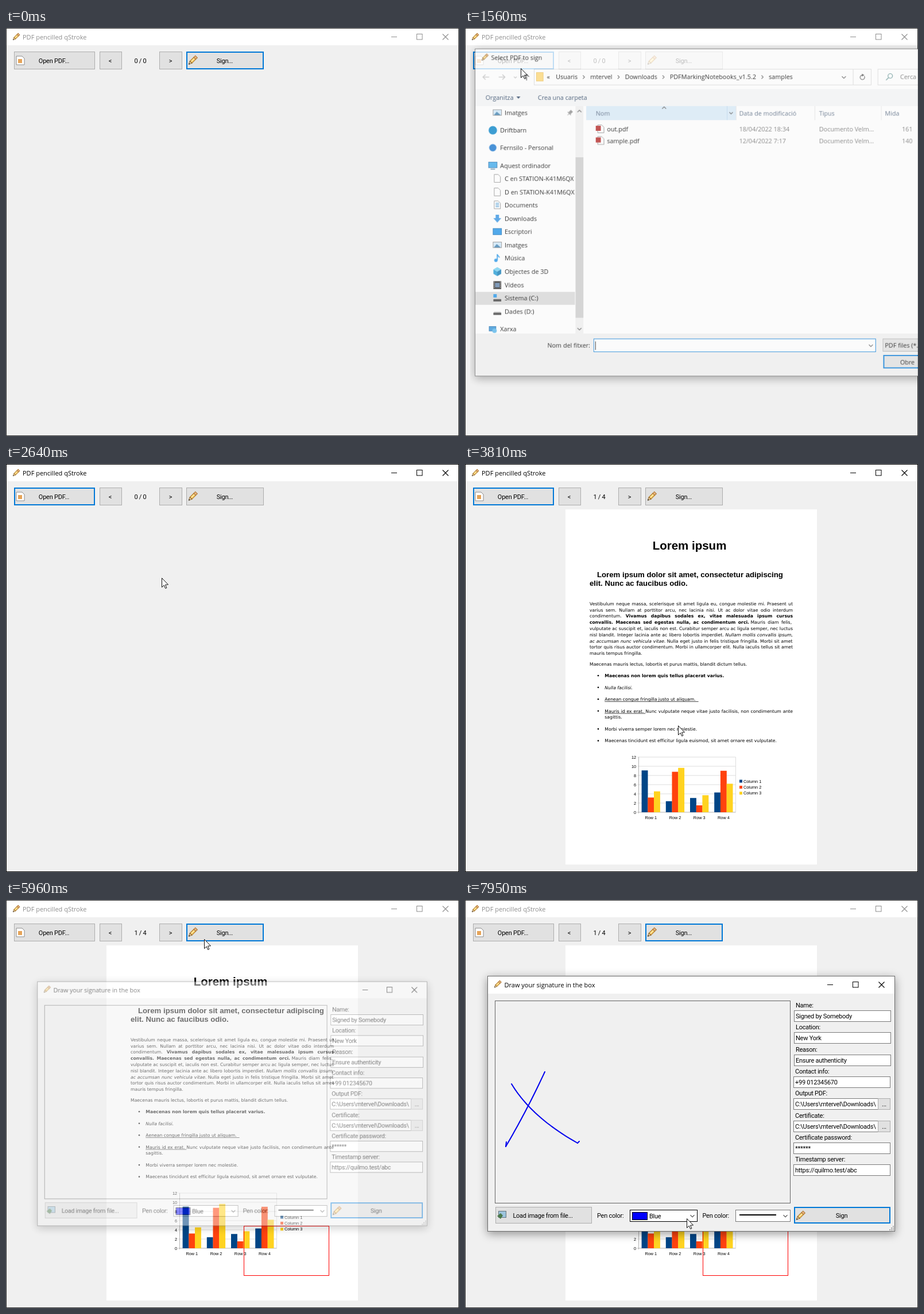
Recreate the animation shown at these times as an HTML page with a canvas. Size 789 by 710 pixels, loop 8000 ms.

```html
<!DOCTYPE html>
<html lang="ca">
<head>
<meta charset="utf-8">
<title>Signing demo</title>
<style>
html, body { margin: 0; width: 100%; height: 100%; overflow: hidden; background: #f0f0f0; }
canvas { display: block; }
</style>
</head>
<body>
<canvas width="789" height="710"></canvas>
<script>
const screenCtx = document.querySelector('canvas').getContext('2d');
const layer = document.createElement('canvas');
layer.width = 960;
layer.height = 710;
const layerCtx = layer.getContext('2d');
let ctx = screenCtx;

const UI = '11px "Open Sans", sans-serif';
const FORM = '11px Roboto, sans-serif';
const SANS = ' "Liberation Sans", sans-serif';
const BLUE = '#0078d7', GREY = '#6d6d6d', EDGE = '#7a7a7a';
const APP = 'PDF pencilled qStroke';

// ---- drawing helpers ----
function rect(color, x, y, w, h) {
  ctx.fillStyle = color;
  ctx.fillRect(x, y, w, h);
}
function box(x, y, w, h, fill, border, size = 1) {
  rect(border, x, y, w, h);
  rect(fill, x + size, y + size, w - 2 * size, h - 2 * size);
}
function text(s, x, y, font = UI, color = '#000', align = 'left') {
  ctx.font = font;
  ctx.letterSpacing = font === FORM ? '-0.25px' : '0px';
  ctx.fillStyle = color;
  ctx.textAlign = align;
  ctx.fillText(s, x, y);
}
function trace(pts) {
  ctx.beginPath();
  pts.forEach(([x, y]) => ctx.lineTo(x, y));
}
function line(color, pts, width = 1) {
  trace(pts);
  ctx.strokeStyle = color;
  ctx.lineWidth = width;
  ctx.stroke();
}
function poly(fill, pts, border) {
  trace(pts);
  ctx.closePath();
  ctx.fillStyle = fill;
  ctx.fill();
  if (!border) return;
  ctx.strokeStyle = border;
  ctx.lineWidth = 1;
  ctx.stroke();
}
function disc(color, x, y, r) {
  ctx.fillStyle = color;
  ctx.beginPath();
  ctx.arc(x, y, r, 0, 7);
  ctx.fill();
}
function ring(color, x, y, r, from = 0, to = 7) {
  ctx.beginPath();
  ctx.arc(x, y, r, from, to);
  ctx.strokeStyle = color;
  ctx.lineWidth = 1.2;
  ctx.stroke();
}
function at(x, y, draw, { scale = 1, turn = 0 } = {}) {
  ctx.save();
  ctx.translate(x, y);
  ctx.rotate(turn * Math.PI / 180);
  ctx.scale(scale, scale);
  draw();
  ctx.restore();
}
function clipped(x, y, w, h, draw) {
  ctx.save();
  ctx.beginPath();
  ctx.rect(x, y, w, h);
  ctx.clip();
  draw();
  ctx.restore();
}
// Chevrons and arrows point right, then turn
function chevron(x, y, turn = 90, r = 3.5, color = '#555') {
  at(x, y, () => line(color, [[-r / 2, -r], [r / 2, 0], [-r / 2, r]], 1.1), { turn });
}
function arrow(x, y, turn, color) {
  at(x, y, () => {
    line(color, [[-5.5, 0], [5.5, 0]], 1.5);
    line(color, [[1, -4.5], [5.5, 0], [1, 4.5]], 1.5);
  }, { turn });
}
function pencil(x, y, scale = 1) {
  at(x + .5 * scale, y + 15 * scale, () => {
    poly('#f4dcb4', [[0, 0], [5, -2.6], [5, 2.6]], '#8a6226');
    box(5, -3, 10, 6, '#f6c55c', '#a8752c');
    box(14, -3, 5, 6, '#e9b080', '#a8752c');
    rect('#fff0b8', 6, -1, 8, 1.4);
    disc('#333', .8, 0, 1);
  }, { scale, turn: -45 });
}
function sheet(x, y, w, h, border = '#8c8c8c') {
  poly('#fff', [[x, y], [x + w - 4, y], [x + w, y + 4], [x + w, y + h], [x, y + h]], border);
}
function windowButtons(x, y, color) {
  line(color, [[x, y], [x + 10, y]]);
  ctx.strokeRect(x + 44.5, y - 5, 9.5, 9.5);
  for (const d of [-5, 5]) line(color, [[x + 89.5, y - d], [x + 99.5, y + d]], 1.1);
}
function button(x, y, w, h, label, center, state) {
  const fill = { hover: '#e5f1fb', down: '#cce4f7' }[state] || '#e1e1e1';
  const border = { hover: BLUE, down: '#005499', focus: BLUE }[state] || '#adadad';
  box(x, y, w, h, fill, border, state === 'focus' ? 2 : 1);
  text(label, center, y + h / 2 + 4, FORM, '#000', 'center');
}
function panel(x, y, w, h) {
  ctx.save();
  ctx.shadowColor = 'rgba(0,0,0,.4)';
  ctx.shadowBlur = 15;
  ctx.shadowOffsetY = 4;
  rect('#6a6a6a', x, y, w, h);
  ctx.restore();
  rect('#fff', x + 1, y + 1, w - 2, h - 2);
}

// ---- pointer motion ----
// Each hop starts where the last one ended; a via point bends it, ink leaves a trail.
const HOPS = [
  { from: 400, to: 1080, end: [97, 70] },
  { from: 1930, to: 2020, end: [259, 169] },
  { from: 2120, to: 2300, end: [271, 198] },
  { from: 3570, to: 3950, end: [414, 567] },
  { from: 4000, to: 4400, end: [562, 653], drag: true },
  { from: 4840, to: 5620, end: [345, 68] },
  { from: 6270, to: 6500, end: [139, 299] },
  { from: 6530, to: 6760, end: [71, 429], via: [108, 366], drag: true, ink: true },
  { from: 6760, to: 6810, end: [72, 421], drag: true, ink: true },
  { from: 6870, to: 7050, end: [81, 320] },
  { from: 7110, to: 7450, end: [196, 423], via: [116, 378], drag: true, ink: true },
  { from: 7450, to: 7490, end: [199, 420], drag: true, ink: true },
  { from: 7540, to: 7930, end: [386, 554] }
];
HOPS.forEach((hop, i) => {
  hop.start = i ? HOPS[i - 1].end : [330, 330];
  hop.release = i + 1 < HOPS.length ? HOPS[i + 1].from : 8000;
  hop.via ||= hop.start.map((v, k) => (v + hop.end[k]) / 2);
});
const [CLICK_OPEN, CLICK_FILE, CLICK_AGAIN, CLICK_SIGN] = [1150, 2340, 2450, 5715];
const CLICKS = [CLICK_OPEN, CLICK_FILE, CLICK_AGAIN, CLICK_SIGN];
const DRAG = HOPS.find(hop => hop.drag);

const clamp = u => Math.max(0, Math.min(1, u));
const smooth = u => u * u * (3 - 2 * u);
const progress = (hop, t) => smooth(clamp((t - hop.from) / (hop.to - hop.from)));
const pointOn = ({ start, via, end }, u) =>
  start.map((v, k) => (1 - u) ** 2 * v + 2 * u * (1 - u) * via[k] + u * u * end[k]);

function pointerAt(t) {
  const hop = HOPS.findLast(h => h.from <= t) || HOPS[0];
  return pointOn(hop, progress(hop, t));
}
const pressed = t => CLICKS.some(c => t >= c && t < c + 90)
  || HOPS.some(h => h.drag && t >= h.from - 30 && t < h.release);

function pointer(t) {
  if (t < HOPS[0].from) return;
  const [x, y] = pointerAt(t).map(Math.round);
  if (pressed(t)) disc('rgba(255,255,0,.55)', x, y, 12);
  at(x + .5, y + .5, () => poly('#fff',
    [[0, 0], [0, 16], [3.7, 12.5], [6.2, 18], [8.4, 17], [6, 11.6], [11, 11.4]], '#111'));
}
function ink(t) {
  ctx.lineJoin = ctx.lineCap = 'round';
  for (const hop of HOPS.filter(h => h.ink && t >= h.from)) {
    const reach = progress(hop, t);
    line('#00e', Array.from({ length: 25 }, (_, i) => pointOn(hop, reach * i / 24)), 2);
  }
  ctx.lineJoin = 'miter';
  ctx.lineCap = 'butt';
}

// ---- the document ----
// Inline marks: * bold, _ italic, ~ underline. A width justifies the line.
function rich(s, x, y, width) {
  const on = {}, runs = [];
  for (const part of s.split(/([*_~])/)) {
    if (part && '*_~'.includes(part)) on[part] = !on[part];
    else if (part) runs.push({ part, under: on['~'],
      font: `${on._ ? 'italic ' : ''}${on['*'] ? 'bold ' : ''}7.7px "DejaVu Sans", sans-serif` });
  }
  const measure = r => {
    ctx.font = r.font;
    return ctx.measureText(r.part).width;
  };
  ctx.letterSpacing = ctx.wordSpacing = '0px';
  const natural = runs.reduce((sum, r) => sum + measure(r), 0);
  if (width) ctx.wordSpacing = (width - natural) / (s.split(' ').length - 1) + 'px';
  for (const r of runs) {
    const w = measure(r);
    text(r.part, x, y, r.font);
    if (r.under) rect('#222', x, y + 1.2, w, .8);
    x += w;
  }
  ctx.wordSpacing = '0px';
}
// All lines but the last are justified
function paragraph(lines, x, y) {
  lines.forEach((s, i) => rich(s, x, y + i * 10.8, i < lines.length - 1 ? 571 - x : 0));
}
const BODY = [
  'Vestibulum neque massa, scelerisque sit amet ligula eu, congue molestie mi. Praesent ut',
  'varius sem. Nullam at porttitor arcu, nec lacinia nisi. Ut ac dolor vitae odio interdum',
  'condimentum. *Vivamus dapibus sodales ex, vitae malesuada ipsum cursus*',
  '*convallis. Maecenas sed egestas nulla, ac condimentum orci.* Mauris diam felis,',
  'vulputate ac suscipit et, iaculis non est. Curabitur semper arcu ac ligula semper, nec luctus',
  'nisl blandit. Integer lacinia ante ac libero lobortis imperdiet. _Nullam mollis convallis ipsum,_',
  '_ac accumsan nunc vehicula vitae._ Nulla eget justo in felis tristique fringilla. Morbi sit amet',
  'tortor quis risus auctor condimentum. Morbi in ullamcorper elit. Nulla iaculis tellus sit amet',
  'mauris tempus fringilla.'
];
const BULLETS = [
  ['*Maecenas non lorem quis tellus placerat varius.*'],
  ['_Nulla facilisi._'],
  ['~Aenean congue fringilla justo ut aliquam.  ~'],
  ['~Mauris id ex erat. ~Nunc vulputate neque vitae justo facilisis, non condimentum ante', 'sagittis.'],
  ['Morbi viverra semper lorem nec molestie.'],
  ['Maecenas tincidunt est efficitur ligula euismod, sit amet ornare est vulputate.']
];
const COLUMNS = { '#004586': [9.1, 2.4, 3.1, 4.3], '#ff420e': [3.2, 8.8, 1.5, 9.02], '#ffd320': [4.54, 9.65, 3.7, 6.2] };

function chart() {
  const small = '7.3px' + SANS;
  for (let v = 0; v <= 12; v += 2) {
    const y = 606 - v * 8;
    rect(v ? '#ddd' : '#b3b3b3', 300, y - .5, 171.5, 1);
    text(v, 298, y + 2.7, small, '#000', 'right');
  }
  rect('#b3b3b3', 302, 510, 1, 98);
  rect('#ddd', 471, 510, 1, 96);
  Object.entries(COLUMNS).forEach(([color, values], j) => {
    values.forEach((v, i) => rect(color, 307.6 + i * 42.2 + j * 10.7, 606 - v * 8, 10.9, v * 8));
    rect(color, 478, 549.5 + j * 10.4, 5, 5);
    text('Column ' + (j + 1), 485, 554.6 + j * 10.4, small);
  });
  for (let i = 0; i < 4; i++) text('Row ' + (i + 1), 323.8 + i * 42.2, 618, small, '#000', 'center');
}
function documentPage() {
  rect('#fff', 175, 79, 438, 618);
  text('Lorem ipsum', 391, 148.5, 'bold 20.5px' + SANS, '#000', 'center');
  text('Lorem ipsum dolor sit amet, consectetur adipiscing', 230, 197, 'bold 13.2px' + SANS);
  text('elit. Nunc ac faucibus odio.', 217, 212.3, 'bold 13.2px' + SANS);
  paragraph(BODY, 217, 245.8);
  rich('Maecenas mauris lectus, lobortis et purus mattis, blandit dictum tellus.', 217, 351.2);
  let y = 371;
  for (const lines of BULLETS) {
    disc('#000', 232, y - 2.7, 1.3);
    paragraph(lines, 243.3, y);
    y += 9.7 + lines.length * 10.8;
  }
  chart();
}

// ---- main window ----
const OPENING = 1480, CHOSEN = 2640, SIGNING = 5920;

function mainWindow(t) {
  const active = t >= CLICK_OPEN && t < 1250 || t >= CHOSEN && t < 5960;
  const tint = active ? '#000' : '#8e8e8e';
  box(0, 0, 789, 710, '#f0f0f0', active ? '#000' : '#2e2e2e');
  rect('#fff', 1, 1, 787, 29);
  pencil(12, 9, .78);
  text(APP, 29, 20, UI, tint);
  windowButtons(671, 15.5, tint);

  const [px, py] = pointerAt(t);
  const blocked = t < 400 || t >= OPENING && t < CHOSEN || t >= 5960;
  const tool = (x, w, label, center, focus) => {
    const hot = !blocked && px >= x && px < x + w && py >= 41 && py < 72;
    button(x, 41, w, 31, label, center, hot ? pressed(t) ? 'down' : 'hover' : focus && 'focus');
  };
  const openFocus = t >= CLICK_OPEN && t < CLICK_SIGN;
  tool(14, 141, 'Open PDF...', 83.5, openFocus);
  tool(163, 39, '<', 181.5);
  tool(267, 40, '>', 286.5);
  tool(314, 135, 'Sign...', 381, !openFocus);
  sheet(18, 49, 14, 15);
  rect('#e5a45a', 21, 54, 7, 7);
  pencil(318, 48);
  text(t < 3010 ? '0 / 0' : '1 / 4', 234, 60.5, FORM, '#000', 'center');
  if (t >= 3010) documentPage();
  if (t >= DRAG.from) {
    const [x, y] = pointOn(DRAG, progress(DRAG, t)).map(Math.round);
    ctx.strokeStyle = '#f00';
    ctx.lineWidth = 1;
    ctx.strokeRect(414.5, 567.5, x - 414, y - 567);
  }
}

// ---- file dialog ----
const ICONS = {
  picture() { box(0, 2, 16, 11, '#cfe8fa', '#8a8a8a'); poly('#3a7fb0', [[2, 12], [7, 6], [14, 12]]); },
  sync() { disc('#0082c9', 8, 8, 7.5); },
  cloud() { disc('#1273cf', 8, 8, 6.5); },
  screen() { box(0, 1, 16, 11, '#3aa8ec', '#1f6fae'); rect('#6f93ad', 4, 13, 8, 2); },
  blank() { sheet(2.5, .5, 11, 14); },
  lines() { ICONS.blank(); for (let y = 4; y < 13; y += 3) rect('#2f8cd0', 5, y, 6, 1.3); },
  down() { rect('#2f92e4', 5, 1, 6, 7); poly('#2f92e4', [[1, 7], [15, 7], [8, 15]]); },
  desk() { box(0, 2, 16, 12, '#1c92e8', '#0c6ab6'); },
  note() { disc('#1c92e8', 5.5, 12, 3); rect('#1c92e8', 7, 1, 1.8, 11); line('#1c92e8', [[8, 2], [12, 7]], 1.8); },
  cube() {
    ['#1b9ad6', '#6fd0f2', '#0c78b4'].forEach((color, face) => {
      const corner = k => [8 + 8 * Math.cos((k + 2.5 + 2 * face - 1) * Math.PI / 3),
        8 + 8 * Math.sin((k + 2.5 + 2 * face - 1) * Math.PI / 3)];
      poly(color, [[8, 8], corner(0), corner(1), corner(2)]);
    });
  },
  film() { box(1, 1, 14, 14, '#5b7fa8', '#222', 3); for (let y = 2; y < 14; y += 3) for (const x of [2, 13]) rect('#eee', x, y, 1, 1.6); },
  drive() { rect('#c9c9c9', 2, 8, 12, 2); rect('#3c3c3c', 1, 10, 14, 4); },
  system() { ICONS.drive(); rect('#1c92e8', 1, 1, 6, 6); },
  network() { box(1, 3, 13, 9, '#2f92d8', '#1f6fae'); disc('#54b6ec', 11, 11, 4); }
};
// A leading dash marks an indented entry
const TREE = ['picture -Imatges', 'sync Driftbarn', 'cloud Fernsilo - Personal', 'screen Aquest ordinador',
  'blank -C en STATION-K41M6QX', 'blank -D en STATION-K41M6QX', 'lines -Documents', 'down -Downloads',
  'desk -Escriptori', 'picture -Imatges', 'note -Música', 'cube -Objectes de 3D', 'film -Vídeos',
  'system -Sistema (C:)', 'drive -Dades (D:)', 'network Xarxa'];
const CRUMBS = ['Usuaris', 'mtervel', 'Downloads', 'PDFMarkingNotebooks_v1.5.2', 'samples'];
const FILES = [['out.pdf', '18/04/2022 18:34', 161], ['sample.pdf', '12/04/2022 7:17', 140]];

function tree() {
  rect('#d9d9d9', 9, 462, 177, 23);
  let y = 144;
  TREE.forEach((entry, i) => {
    const [, icon, dash, label] = entry.match(/(\w+) (-?)(.*)/);
    if (i) y += dash ? 23.55 : 31.2;
    const x = dash ? 40 : 32;
    at(x, Math.round(y) - 8, ICONS[icon]);
    text(label, x + 21, Math.round(y) + 4);
  });
  at(177, 144, () => {
    rect('#8a8a8a', -2.5, -5, 5, 6);
    rect('#8a8a8a', -4, 1, 8, 1.2);
    rect('#8a8a8a', -.5, 2, 1, 4);
  }, { turn: 45 });
}
function addressBar() {
  arrow(28, 80.5, 180, '#c4c4c4');
  arrow(56, 80.5, 0, '#c4c4c4');
  chevron(80, 81, 90, 2.5, '#bbb');
  arrow(100, 81, -90, '#555');
  box(113, 66, 600, 29, '#fff', '#d9d9d9');
  rect('#d9d9d9', 680, 66, 1, 29);
  box(117, 72, 13, 16, '#ffd875', '#f0c35a');
  text('«', 136, 84);
  let x = 152;
  CRUMBS.forEach((s, i) => {
    if (i) chevron(x - 11.5, 80.5, 0, 3);
    text(s, x, 84);
    x += ctx.measureText(s).width + 22.5;
  });
  chevron(664, 81);
  ring('#555', 697, 81, 4, -.6, 4.6);
  poly('#555', [[696, 74.5], [700.5, 77], [696, 79.5]]);
  box(724, 66, 175, 29, '#fff', '#d9d9d9');
  ring('#5b8f8f', 746.5, 78.5, 4);
  line('#5b8f8f', [[743.5, 81.5], [739, 86]], 1.3);
  text('Cerca', 764, 84, UI, GREY);
}
function fileDialog(t) {
  const wide = 898;
  panel(8, 30, wide + 2, 582);
  pencil(20, 39, .78);
  text('Select PDF to sign', 37, 50);
  addressBar();

  rect('#f5f6f7', 9, 102, wide, 30);
  text('Organitza', 27, 121, UI, '#1e395b');
  poly('#1e395b', [[82, 115], [89, 115], [85.5, 119]]);
  text('Crea una carpeta', 120, 121, UI, '#1e395b');

  clipped(9, 132, 177, 404, tree);
  rect('#f0f0f0', 187, 132, 14, 404);
  rect('#cdcdcd', 187, 223, 14, 285);
  chevron(194, 141, -90);
  chevron(194, 528);

  rect('#d9ebf9', 206, 132, 266, 25);
  rect('#b9d7ee', 456, 132, 1, 25);
  for (const x of [472, 612, 730]) rect('#e5e5e5', x, 132, 1, 25);
  chevron(344.5, 135, -90);
  chevron(463.5, 144.5, 90, 3);
  const heads = { Nom: 223, 'Data de modificació': 478, Tipus: 620, Mida: 737 };
  for (const s in heads) text(s, heads[s], 149, UI, '#4c607a');

  const chosen = t >= CLICK_FILE;
  if (pointerAt(t)[1] > 184) rect(chosen ? '#cce8ff' : '#e5f3ff', 206, 184, wide - 197, 21);
  FILES.forEach(([name, date, size], i) => {
    const y = 177 + i * 20.7;
    sheet(226.5, y - 11.5, 11, 14);
    rect('#b3201f', 223, y - 10, 9, 9);
    text(name, 243, y);
    text(date, 478, y, UI, GREY);
    text('Documento Velm...', 620, y, UI, GREY);
    text(size, 786, y, UI, GREY, 'right');
  });

  rect('#f0f0f0', 9, 536, wide, 75);
  text('Nom del fitxer:', 213, 561, UI, '#000', 'right');
  box(219, 545, 502, 24, '#fff', BLUE);
  if (chosen) text('sample.pdf', 223, 561);
  else rect('#000', 222, 550, 1, 15);
  chevron(712, 557.5);
  box(733, 545, 150, 23, '#e1e1e1', '#adadad');
  text('PDF files (*.pdf)', 737, 561);
  box(734, 574, 150, 24, '#e1e1e1', BLUE, 2);
  text('Obre', 764, 590.5);
}

// ---- signature dialog ----
const PATH = 'C:\\Users\\mtervel\\Downloads\\';
const FIELDS = [['Name:', 'Signed by Somebody'], ['Location:', 'New York'], ['Reason:', 'Ensure authenticity'],
  ['Contact info:', '+99 012345670'], ['Output PDF:', PATH], ['Certificate:', PATH],
  ['Certificate password:', '******'], ['Timestamp server:', 'https://quilmo.test/abc']];

function signDialog(t) {
  panel(39, 132, 710, 445);
  rect('#f0f0f0', 40, 163, 708, 413);
  pencil(51, 140, .8);
  text('Draw your signature in the box', 68.5, 152);
  windowButtons(631, 147.5, '#000');
  box(52, 175, 515, 353, '#f0f0f0', '#646464');
  ink(t);

  FIELDS.forEach(([label, value], i) => {
    const y = Math.round(192 + i * 38.3), x = i < 3 ? 573 : 572;
    const browse = value === PATH;
    text(label, x + 3, y - 5.5, FORM);
    box(x, y, browse ? 148 : 169, 20, '#fff', EDGE);
    clipped(x + 1, y, browse ? 146 : 166, 20, () => text(value, x + 3, y + 14, FORM));
    if (browse) button(719, y, 22, 20, '...', 730);
  });

  button(53, 534, 168, 29, 'Load image from file...', 135.5);
  box(58, 541, 14, 12, '#9cc4dd', '#66757d');
  poly('#4c7a4c', [[56, 550], [62, 545], [66, 549], [62, 555]]);
  text('Pen color:', 230, 553, FORM);
  const [px, py] = pointerAt(t);
  box(287, 539, 118, 21, '#fff', px > 287 && py > 539 ? '#000' : EDGE);
  box(291, 543, 27, 14, '#00f', '#000');
  text('Blue', 321, 554, FORM);
  chevron(396, 550);
  text('Pen color:', 413.5, 553, FORM);
  box(471, 539, 96, 21, '#fff', EDGE);
  rect('#000', 478, 547, 64, 2);
  chevron(558, 550);
  button(573, 534, 168, 29, 'Sign', 656, 'focus');
  pencil(577, 541);
  for (let i = 0; i < 3; i++)
    for (let j = 0; j <= i; j++) rect('#a5a5a5', 745 - j * 3, 567 + i * 3, 2, 2);
}

// Shows a dialog as one sheet that fades and grows around its middle
function reveal(draw, t, shown, cx, cy) {
  if (shown <= 0) return;
  if (shown >= 1) return draw(t);
  ctx = layerCtx;
  ctx.clearRect(0, 0, layer.width, layer.height);
  draw(t);
  ctx = screenCtx;
  ctx.globalAlpha = shown;
  at(cx, cy, () => ctx.drawImage(layer, -cx, -cy), { scale: .92 + .08 * shown });
  ctx.globalAlpha = 1;
}
const entering = (t, from) => 1 - (1 - clamp((t - from) / 220)) ** 3;

function frame(t) {
  mainWindow(t);
  reveal(fileDialog, t, Math.min(entering(t, OPENING), clamp((CHOSEN - t) / 120)), 458, 321);
  reveal(signDialog, t, entering(t, SIGNING), 394, 354);
  pointer(t);
}
const start = performance.now();
(function loop() {
  frame((performance.now() - start) % 8000);
  requestAnimationFrame(loop);
})();
</script>
</body>
</html>
```
